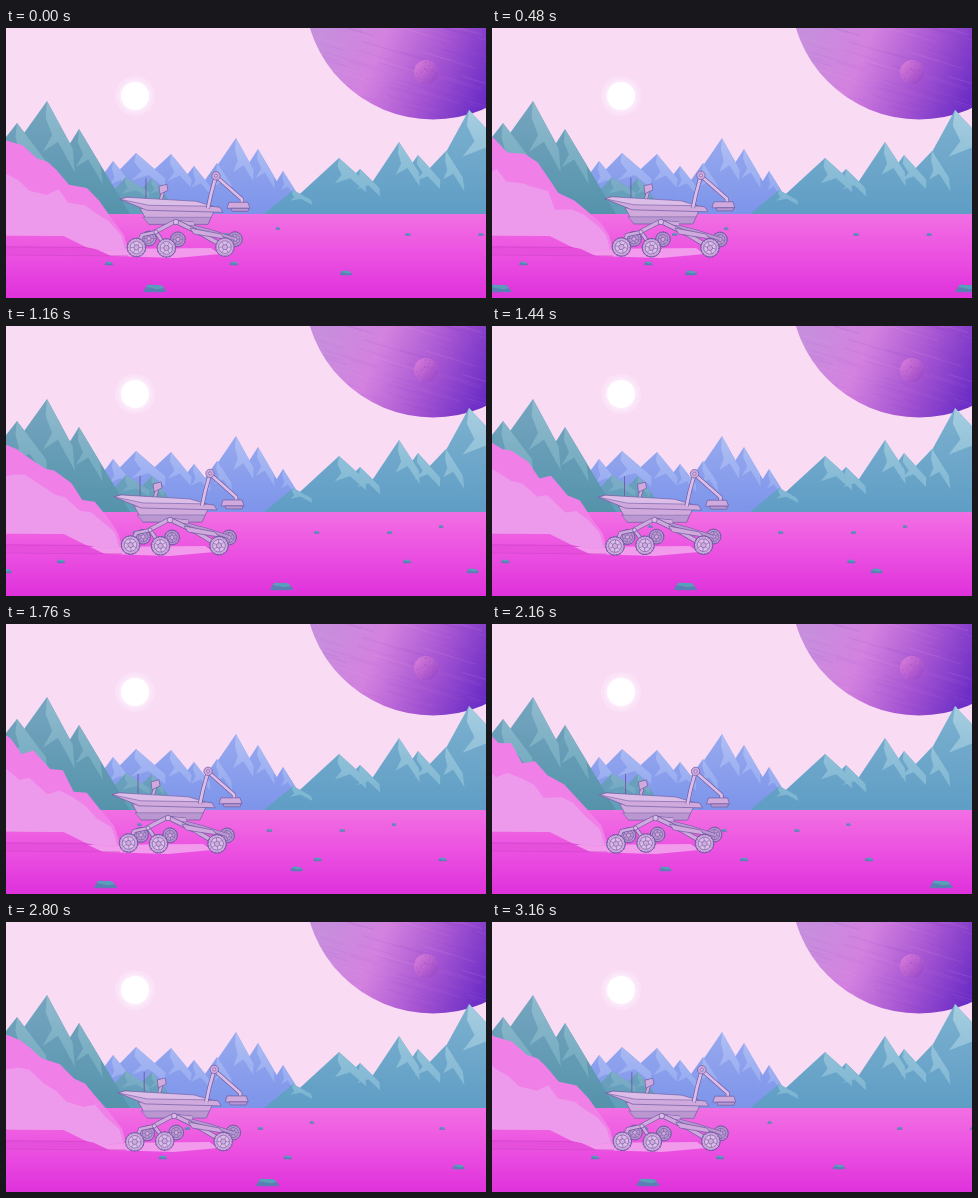
An HTML page with a canvas that plays this animation: 480x270 px, repeating every 3200 ms.

```html
<!DOCTYPE html>
<html lang="en">
<head>
<meta charset="utf-8">
<title>Rover</title>
<style>
  html, body { margin: 0; width: 100%; height: 100%; overflow: hidden; background: #f9daf2; }
  canvas { display: block; width: 480px; height: 270px; }
</style>
</head>
<body>
<canvas id="stage"></canvas>
<script>
const W = 480, H = 270, LOOP = 3200, STEP = 40, TAU = Math.PI * 2, HORIZON = 186;
const canvas = document.getElementById('stage');
const scale = window.devicePixelRatio || 1;
canvas.width = W * scale;
canvas.height = H * scale;
let g = canvas.getContext('2d');

const LINE = '#6f5aa3', BODY = '#d0aadd', PALE = '#dcbde8', SHADE = '#ba97d0';

function gradient(x0, y0, x1, y1, ...colors) {
  const fill = g.createLinearGradient(x0, y0, x1, y1);
  colors.forEach((c, i) => fill.addColorStop(i / (colors.length - 1), c));
  return fill;
}

function trace(pts) {
  g.beginPath();
  for (let i = 0; i < pts.length; i += 2) g.lineTo(pts[i], pts[i + 1]);
}

function poly(pts, fill, stroke, width = 0.7) {
  trace(pts);
  g.closePath();
  g.fillStyle = fill;
  g.fill();
  if (stroke) { g.strokeStyle = stroke; g.lineWidth = width; g.stroke(); }
}

function line(pts, color, width) {
  trace(pts);
  g.strokeStyle = color;
  g.lineWidth = width;
  g.stroke();
}

function disc(x, y, r, fill, stroke, width = 0.7) {
  g.beginPath();
  g.arc(x, y, r, 0, TAU);
  g.fillStyle = fill;
  g.fill();
  if (stroke) { g.strokeStyle = stroke; g.lineWidth = width; g.stroke(); }
}

// An outlined bar
function bar(pts, width, fill = BODY) {
  g.lineJoin = 'round';
  line(pts, LINE, width + 1.3);
  line(pts, fill, width);
}

function random(seed) {
  return () => (seed = (seed * 16807) % 2147483647) / 2147483647;
}

// ---- still scenery ----

function drawSky() {
  g.fillStyle = '#f9dbf3';
  g.fillRect(0, 0, W, H);
  disc(129, 68, 20, '#fae2f7');
  disc(129, 68, 16.5, '#fce9f9');
  disc(129, 68, 14, '#ffffff');
}

function drawPlanet() {
  const rnd = random(71);
  g.save();
  disc(427, -37, 128.5, gradient(318, 5, 478, 75, '#c78edd', '#d381df', '#a655d2', '#6a2cc5'));
  g.clip();
  for (let i = 0; i < 90; i++) {
    const x = 285 + rnd() * 190, y = rnd() * 100 - 15, len = 15 + rnd() * 50;
    g.globalAlpha = 0.04 + rnd() * 0.08;
    line([x, y, x + len, y + len * 0.3], rnd() < 0.5 ? '#f0a0e6' : '#7a36c8', 0.6 + rnd());
  }
  g.restore();
  g.save();
  disc(420, 44, 12, gradient(411, 36, 430, 53, '#d377d8', '#9a48c8'));
  g.clip();
  g.globalAlpha = 0.25;
  for (let i = 0; i < 32; i++) {
    disc(408 + rnd() * 24, 32 + rnd() * 24, 0.7, rnd() < 0.5 ? '#e98cd8' : '#8038b8');
  }
  g.restore();
}

// Each peak is [x, y, left foot, right foot]; its right side catches the light.
function drawRange(peaks, seed, body, lit) {
  const rnd = random(seed);
  const top = Math.min(...peaks.map(p => p[1]));
  const shade = colors => gradient(0, top, 0, HORIZON, ...colors);
  for (const [x, y, left, right] of peaks) {
    poly([x, y, right, HORIZON, left, HORIZON], shade(body));
  }
  for (const [x, y, , right] of peaks) {
    const drop = HORIZON - y;
    const at = (depth, side) => [x + (right - x) * depth * side, y + drop * depth];
    const pts = [x, y];
    for (let i = 1; i <= 3; i++) pts.push(...at(i * 0.15, i % 2 ? -0.15 : 0.1 + rnd() * 0.2));
    pts.push(...at(0.36, 0.5), ...at(0.55 + rnd() * 0.1, 0.72), ...at(0.42, 1));
    poly(pts, shade(lit));
  }
}

function drawMountains() {
  drawRange([
    [107, 133, 68, 150], [130, 125, 70, 200], [165, 126, 100, 214], [188, 138, 150, 226],
    [211, 135, 175, 245], [252, 121, 210, 290], [230, 110, 178, 272], [277, 143, 250, 304]
  ], 5, ['#97a9ee', '#7d94ea'], ['#b0bff4', '#8ba2ee']);
  drawRange([[120, 149, 86, 176], [146, 150, 110, 174]], 9, ['#6b9fbd', '#609fba'], ['#7fadc8', '#6ba6be']);
  drawRange([
    [11, 95, -60, 80], [73, 101, 20, 124], [41, 73, -40, 102]
  ], 13, ['#76a5c0', '#5593ab'], ['#90bace', '#66a3b8']);
  drawRange([
    [287, 162, 258, 330], [354, 141, 310, 400], [333, 130, 272, 395], [412, 127, 370, 465],
    [393, 114, 345, 440], [440, 123, 380, 480], [463, 82, 406, 560]
  ], 21, ['#7db1cf', '#5f9dc5'], ['#a6cde0', '#78b2d0']);
}

function drawGround() {
  g.fillStyle = gradient(0, HORIZON, 0, H, '#f26fe3', '#eb50e1', '#df31dc');
  g.fillRect(0, HORIZON, W, H - HORIZON);
}

// ---- rocks: each row repeats every `tile` px; speed in px/ms ----

const ROWS = [
  { y: 200.5, w: 5, tile: 254.5, speed: 0.0787, xs: [272] },
  { y: 206.5, w: 6, tile: 254.5, speed: 0.0787, xs: [402, 475] },
  { y: 235.5, w: 9, tile: 471, speed: 0.149, xs: [103, 228] },
  { y: 245, w: 13, tile: 467, speed: 0.2933, xs: [340] },
  { y: 260.5, w: 24, tile: 467, speed: 0.2933, xs: [149] }
];

function drawRock(x, y, w) {
  const h = 1 + w * 0.28;
  const at = (...p) => p.map((v, i) => i % 2 ? y + v * h : x + v * w);
  poly(at(-.5, .35, -.3, -.5, .25, -.42, .5, .4, .3, .5, -.38, .5), '#5b7fb4');
  poly(at(-.38, -.2, -.3, -.5, .25, -.42, .38, -.05, .1, .1), '#5a9fba');
}

function drawRocks(t) {
  for (const { y, w, tile, speed, xs } of ROWS) {
    for (const x of xs) {
      let px = ((x - speed * t + 20) % tile + tile) % tile - 20;
      for (; px < W + 20; px += tile) drawRock(px, y, w);
    }
  }
}

// ---- dust: facets that rise and drift left behind the wheels ----

const PUFFS = 24, GAP = 13, DUST_BASE = 207;

function drawPuffs(t, tip, height, seed, fill) {
  const rnd = random(seed);
  const bumps = Array.from({ length: PUFFS }, () => [rnd() - 0.5, rnd() - 0.5]);
  const drift = t / LOOP * PUFFS, whole = Math.floor(drift);
  const pts = [tip + 4, 221, tip, DUST_BASE];
  for (let j = 0; j < 12; j++) {
    const [bx, by] = bumps[(j - whole + PUFFS) % PUFFS];
    const u = (j + drift - whole) * GAP / tip;
    const grow = Math.min(1, u * 3);
    pts.push(tip * (1 - u) + bx * 8 * grow, DUST_BASE - height * u ** 0.75 + by * 15 * grow);
  }
  poly([...pts, -60, DUST_BASE, 58, DUST_BASE + 1, 80, 219, 100, 223], fill);
}

function drawDust(t, dx) {
  drawPuffs(t, 118 + dx, 95, 37, '#f080e8');
  drawPuffs(t, 115 + dx, 61, 83, '#ee9aec');
}

function drawTracks(dx) {
  const x = 130 + dx;
  poly([0, 218, x, 219, x, 228, 0, 227], '#e64fdc');
  poly([x - 40, 221, x + 75, 220, x + 84, 226, x + 40, 230, x - 25, 228], '#f29aec');
  for (const y of [219, 227]) line([0, y, x - 8, y + 1], '#d247cb', 0.7);
}

// ---- rover ----

function wheel(x, y, r, turn, far) {
  const spokes = (n, from, to, width) => {
    for (let i = 0; i < n; i++) {
      const c = Math.cos(i / n * TAU) * r, s = Math.sin(i / n * TAU) * r;
      line([c * from, s * from, c * to, s * to], LINE, width);
    }
  };
  g.save();
  g.translate(x, y);
  g.rotate(turn);
  disc(0, 0, r, far ? SHADE : BODY, LINE, 0.9);
  spokes(16, 0.87, 1.05, 0.7);
  disc(0, 0, r * 0.68, far ? SHADE : PALE, LINE, 0.6);
  spokes(6, 0.25, 0.66, 0.5);
  disc(0, 0, r * 0.28, BODY, LINE, 0.6);
  g.restore();
}

function drawRover(t, dx) {
  const turn = t / LOOP * TAU * 8;
  const shake = n => 0.5 * Math.sin(t / LOOP * TAU * 5 + n);
  const rear = 219.5 + shake(0), mid = 219.5 + shake(2), front = 219.5 + shake(4);
  g.save();
  g.translate(dx, 0);

  for (const x of [143, 172, 229]) wheel(x, 211 + shake(x), 7.4, turn, true);
  bar([177, 196, 204, 203, 229, 211], 2.4, SHADE);

  g.save();
  g.translate(0, shake(1) * 0.7);
  // antenna and mast
  line([140, 170, 140, 150], LINE, 0.9);
  bar([155, 171, 157, 164], 2.4);
  poly([153, 158, 161, 156, 162, 162, 154, 166], BODY, LINE);

  // hull
  poly([134, 180, 209, 181, 202, 196, 143, 196], BODY, LINE);
  poly([137, 189, 205, 189, 202, 196, 143, 196], SHADE, LINE, 0.5);
  poly([114, 171, 121, 169, 163, 173, 214, 179, 217, 184, 141, 182], BODY, LINE);
  poly([114, 171, 121, 169, 190, 173, 207, 178, 143, 177], PALE, LINE, 0.6);

  // arm and camera
  bar([202, 180, 205, 166, 210, 148, 236, 171, 236, 176], 2.8, PALE);
  disc(210, 147.5, 4.2, BODY, LINE);
  disc(210, 147.5, 1.6, PALE, LINE, 0.6);
  poly([223, 174, 242, 174, 244, 180, 221, 180], BODY, LINE);
  poly([225, 180, 243, 180, 242, 183, 226, 183], SHADE, LINE);
  g.restore();

  // suspension
  bar([131, rear, 136, 207, 150, 204, 161, mid], 2.8);
  bar([149, 204, 168, 194, 188, 196], 3.4);
  bar([169, 193, 196, 206, 219, front], 3.6);
  poly([184, 200, 215, 206, 219, 211, 188, 206], BODY, LINE);
  disc(170, 194, 2.7, PALE, LINE);
  disc(150, 204, 2, PALE, LINE);

  wheel(130.5, rear, 9.3, turn);
  wheel(160.5, mid, 9.3, turn);
  wheel(219, front, 9.3, turn);
  g.restore();
}

// ---- playback ----

const scene = document.createElement('canvas');
scene.width = canvas.width;
scene.height = canvas.height;
const main = g;
g = scene.getContext('2d');
g.scale(scale, scale);
drawSky();
drawPlanet();
drawMountains();
drawGround();
g = main;
g.scale(scale, scale);

const start = performance.now();

function draw(now) {
  const t = Math.floor(Math.max(0, now - start) % LOOP / STEP) * STEP;
  const dx = -4 + 4 * Math.cos((t - 100) / LOOP * TAU);
  g.drawImage(scene, 0, 0, W, H);
  drawRocks(t);
  drawTracks(dx);
  drawDust(t, dx);
  drawRover(t, dx);
  requestAnimationFrame(draw);
}
draw(start);
</script>
</body>
</html>
```
